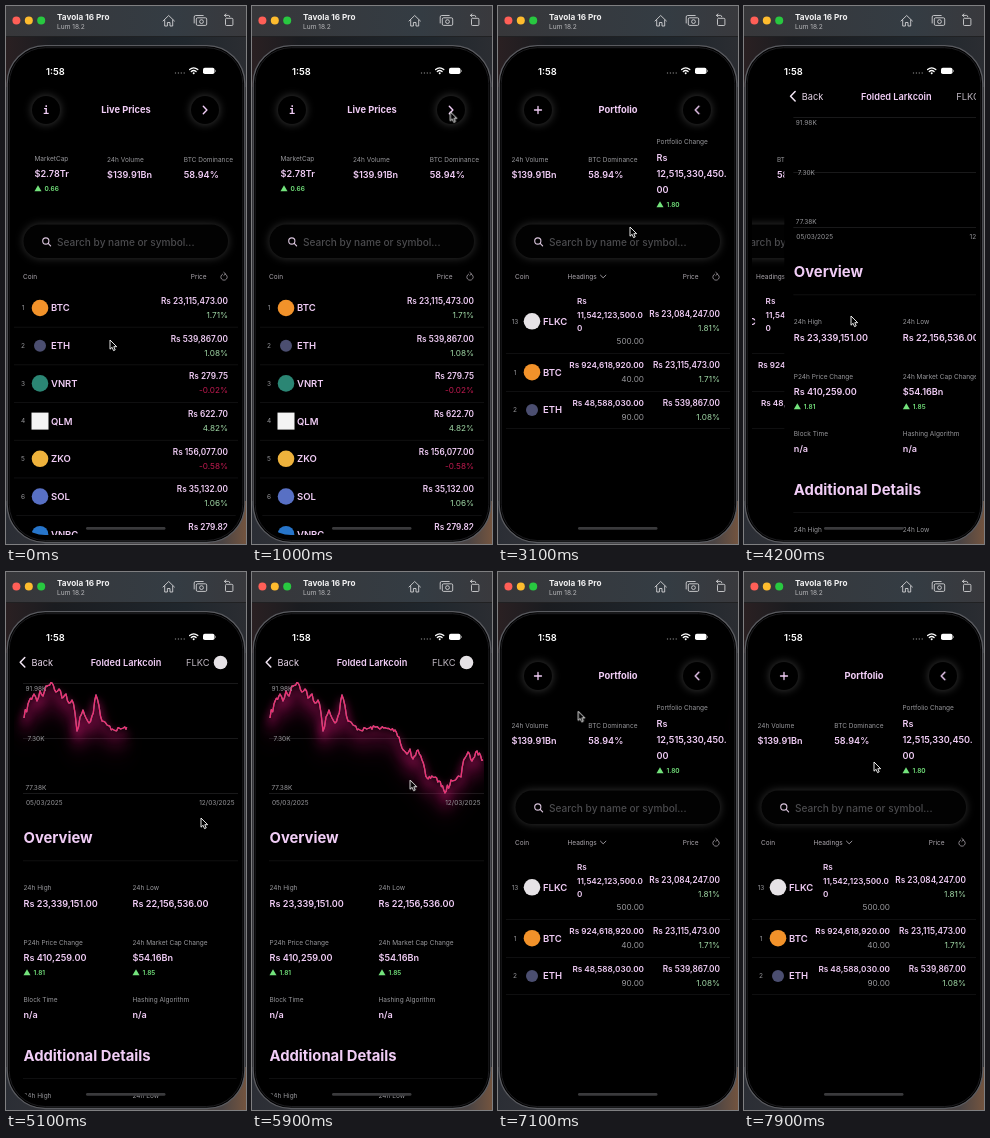
Recreate the animation shown at these times as an HTML page. Size 240x538 px, loop 8 s.

```html
<!DOCTYPE html>
<html lang="en">
<head>
<meta charset="utf-8">
<title>Portfolio app</title>
<style>
  html, body { margin: 0; width: 100%; height: 100%; overflow: hidden; background: #000; }
  svg { display: block; width: 240px; height: 538px; font-family: Inter, "Liberation Sans", sans-serif; }
  text { white-space: pre; }
  .glow { filter: drop-shadow(0 0 4px rgba(255, 255, 255, .24)); }
  .bar { filter: drop-shadow(0 0 4px rgba(255, 255, 255, .2)); }
  .spin { transform-box: fill-box; transform-origin: center; }
  .line {
    filter: drop-shadow(.7px 0 0 #82898a) drop-shadow(0 5px 4px rgba(215, 20, 120, .9))
      drop-shadow(0 10px 6px rgba(215, 20, 120, .6)) drop-shadow(0 15px 7px rgba(200, 15, 110, .25));
  }
</style>
</head>
<body>
<svg id="stage" viewBox="0 0 240 538">
  <defs>
    <clipPath id="screen"><rect x="8" y="46" width="224" height="483" rx="31"/></clipPath>
    <linearGradient id="wallTop">
      <stop offset="0" stop-color="#2a2022"/><stop offset=".2" stop-color="#1a1c20"/>
      <stop offset=".75" stop-color="#20272d"/><stop offset="1" stop-color="#2b2d32"/>
    </linearGradient>
    <linearGradient id="wallBottom">
      <stop offset="0" stop-color="#2b2e35"/><stop offset=".9" stop-color="#4a4444"/>
      <stop offset="1" stop-color="#73543f"/>
    </linearGradient>
    <linearGradient id="toolbar">
      <stop offset="0" stop-color="#37373a"/><stop offset=".7" stop-color="#343c43"/>
      <stop offset="1" stop-color="#39393d"/>
    </linearGradient>
  </defs>
</svg>
<script>
const LOOP = 8000;
const TOGGLE = 1400, PUSH = 4050, POP = 6650;
const DRAW = 4570;
const SLIDE = 'cubic-bezier(.25,.8,.4,1)';
const SPRING = 'cubic-bezier(.3,.75,.35,1)';
const HOLD = 'steps(1,end)';
const PINK = '#f1cdf6', GRAY = '#97979b', GREEN = '#a0d8a6', RED = '#c01a50', LIME = '#73e37c';

const stage = document.getElementById('stage');

function add(parent, tag, attrs = {}) {
  const el = document.createElementNS('http://www.w3.org/2000/svg', tag);
  for (const k in attrs) el.setAttribute(k, attrs[k]);
  return parent.appendChild(el);
}
const group = (parent, attrs) => add(parent, 'g', attrs);
const rect = (p, x, y, width, height, fill, more) => add(p, 'rect', { x, y, width, height, fill, ...more });
const disc = (p, cx, cy, r, fill, more) => add(p, 'circle', { cx, cy, r, fill, ...more });
const stroke = (p, d, color, width = 1, more) => add(p, 'path', {
  d, fill: 'none', stroke: color, 'stroke-width': width,
  'stroke-linecap': 'round', 'stroke-linejoin': 'round', ...more });

// y is the middle of the capital letters
function label(p, s, x, y, size, fill = GRAY, weight = 400, anchor = 'start') {
  const el = add(p, 'text', { x, y: y + size * .36, fill, 'font-size': size, 'font-weight': weight, 'text-anchor': anchor });
  el.textContent = s;
  return el;
}
const rule = (p, y, x = 8, w = 224, color = '#161617') => rect(p, x, y, w, .7, color);

function play(el, steps) {
  el.animate(steps.map(([t, props, easing = 'linear']) => ({ offset: t / LOOP, easing, ...props })),
    { duration: LOOP, iterations: Infinity });
}
const move = (x, y = 0) => ({ transform: `translate(${x}px,${y}px)` });
const fade = opacity => ({ opacity });

function swap(before, after) {
  play(before, [[0, fade(1), HOLD], [TOGGLE, fade(0)], [LOOP, fade(0)]]);
  play(after, [[0, fade(0), HOLD], [TOGGLE, fade(1)], [LOOP, fade(1)]]);
}
function slide(el, from, to) {
  play(el, [[0, move(from)], [TOGGLE, move(from), SPRING], [TOGGLE + 290, move(to)], [LOOP, move(to)]]);
}

function gain(p, x, y, s) {
  add(p, 'path', { d: `M${x} ${y + 3}l3.5-6 3.5 6z`, fill: LIME });
  label(p, s, x + 10, y, 6.5, LIME, 600);
}
function stat(p, x, y, title, value, change) {
  label(p, title, x, y, 6.5);
  label(p, value, x, y + 15.3, 9.1, PINK, 600);
  if (change) gain(p, x, y + 30, change);
}
function reload(p, x, y) {
  stroke(p, `M${x + 1.2} ${y - 2.8}a3.2 3.2 0 1 1-2.6 .1M${x - .2} ${y - 4.4}l1.7 1.5-1.7 1.5`, '#b9b2bb', .7);
}

function coin(p, y, [rank, symbol, color, price, change, square]) {
  label(p, rank, 17, y, 6.5, GRAY, 400, 'middle');
  if (square) rect(p, 25.5, y - 8.5, 17, 17, color);
  else disc(p, 34, y, symbol === 'ETH' ? 6 : 8.3, color);
  label(p, symbol, 45, y, 9.5, PINK, 600);
  label(p, 'Rs ' + price, 222, y - 7, 8.25, PINK, 600, 'end');
  label(p, change + '%', 222, y + 7, 8.2, change < 0 ? RED : GREEN, 400, 'end');
}

const BTC = ['1', 'BTC', '#f2922a', '23,115,473.00', '1.71'];
const ETH = ['2', 'ETH', '#4b4e70', '539,867.00', '1.08'];
const market = [
  BTC, ETH,
  ['3', 'VNRT', '#2b8674', '279.75', '-0.02'],
  ['4', 'QLM', '#f4f4f4', '622.70', '4.82', true],
  ['5', 'ZKO', '#eeb23c', '156,077.00', '-0.58'],
  ['6', 'SOL', '#5870c4', '35,132.00', '1.06'],
  ['7', 'VNRC', '#2775ca', '279.82', '-0.01'],
];

function desktop() {
  rect(stage, 0, 0, 240, 538, '#141416');
  rect(stage, 0, 31, 240, 50, 'url(#wallTop)');
  rect(stage, 0, 495, 240, 43, 'url(#wallBottom)');
  rect(stage, 0, 0, 240, 31, 'url(#toolbar)');
  rect(stage, 0, 30.4, 240, .6, '#111');
  ['#ff5f57', '#febc2e', '#28c840'].forEach((c, i) => disc(stage, 10.4 + i * 12.4, 14.5, 4, c));
  label(stage, 'Tavola 16 Pro', 51, 10.8, 8.2, '#f0f0f1', 700);
  label(stage, 'Lum 18.2', 51, 20.3, 6.6, '#b8b8bb');
  const c = '#d2d2d4';
  stroke(stage, 'M157 15l5.7-5.5 5.7 5.5M158.7 14v6h2.7v-3.5h2.6v3.5h2.7v-6', c, .9);
  rect(stage, 190.3, 11.8, 10.4, 7.6, 'none', { rx: 1.3, stroke: c, 'stroke-width': .9 });
  stroke(stage, 'M188.2 17v-6q0-1.5 1.5-1.5h7.5', c, .9);
  disc(stage, 195.5, 15.6, 1.9, 'none', { stroke: c, 'stroke-width': .9 });
  rect(stage, 219.5, 12.3, 7.4, 7.2, 'none', { rx: 1, stroke: c, 'stroke-width': .9 });
  stroke(stage, 'M218.6 9.4h3.8q1.4 0 1.4 1.4M220 8l-1.6 1.4 1.6 1.4', c, .9);
  rect(stage, 1.2, 39.7, 237.6, 496.8, '#000', { rx: 38, stroke: '#5a5b60', 'stroke-width': 1.3 });
  rect(stage, 3.2, 41.7, 233.6, 492.8, 'none', { rx: 36, stroke: '#1d1d20', 'stroke-width': 1 });
}

function statusBar() {
  label(stage, '1:58', 40, 65.2, 9.4, '#fff', 600);
  for (let i = 0; i < 4; i++) disc(stage, 169.5 + i * 2.9, 67, .7, '#777');
  stroke(stage, 'M183.6 63.6q4.1-3.5 8.2 0M185.3 65.5q2.4-2 4.8 0', '#fff', 1.3);
  disc(stage, 187.7, 67.2, 1, '#fff');
  rect(stage, 197, 61.8, 11.5, 6.2, '#fff', { rx: 1.8 });
  rect(stage, 209, 63.8, .9, 2.2, '#999', { rx: .4 });
}

function header(p) {
  const ring = disc(p, 40, 104, 26, 'none', { stroke: '#d8d8d8', 'stroke-width': 3, class: 'spin' });
  const scale = (k, opacity) => ({ transform: `scale(${k})`, opacity });
  play(ring, [[0, scale(0, 0), HOLD], [TOGGLE, scale(0, .7), 'ease-out'], [TOGGLE + 500, scale(1, 0)], [LOOP, scale(1, 0)]]);
  disc(p, 40, 104, 14, '#000', { class: 'glow' });
  disc(p, 199, 104, 14, '#000', { class: 'glow' });
  const info = label(p, 'i', 40, 104, 10, PINK, 700, 'middle');
  info.setAttribute('font-family', '"DejaVu Sans Mono", monospace');
  swap(info, stroke(p, 'M36.5 104h7M40 100.5v7', PINK, 1.3));
  swap(label(p, 'Live Prices', 120, 104, 9.3, PINK, 700, 'middle'),
    label(p, 'Portfolio', 120, 104, 9.4, PINK, 700, 'middle'));
  const chevron = stroke(p, 'M197.3 100.2l3.6 3.8-3.6 3.8', PINK, 1.4, { class: 'spin' });
  const turn = deg => ({ transform: `rotate(${deg}deg)` });
  play(chevron, [[0, turn(0)], [TOGGLE, turn(0), SPRING], [TOGGLE + 290, turn(180)], [LOOP, turn(180)]]);
}

function stats(p) {
  const g = group(p);
  stat(g, 28.5, 152.3, 'MarketCap', '$2.78Tr', '0.66');
  stat(g, 101, 153.5, '24h Volume', '$139.91Bn');
  stat(g, 177.8, 153.5, 'BTC Dominance', '58.94%');
  label(g, 'Portfolio Change', 246, 136, 6.5);
  ['Rs', '12,515,330,450.', '00'].forEach((s, i) => label(g, s, 246, 152 + i * 16, 9.1, PINK, 600));
  gain(g, 246, 198.3, '1.80');
  slide(g, 0, -87.5);
}

function searchBar(p) {
  rect(p, 17.5, 218.5, 204.5, 33.5, '#020202', { rx: 16.7, class: 'bar' });
  disc(p, 39.8, 235, 3.1, 'none', { stroke: '#d9c4dc', 'stroke-width': 1.1 });
  stroke(p, 'M42.2 237.4l2.4 2.5', '#d9c4dc', 1.2);
  label(p, 'Search by name or symbol...', 51, 236, 10.1, '#4b4b4e', 500);
}

function holding(p, y, amount, count) {
  label(p, 'Rs ' + amount, 146, y - 7, 8.2, PINK, 600, 'end');
  label(p, count, 146, y + 6.6, 8.2, GRAY, 400, 'end');
}

function lists(p) {
  label(p, 'Coin', 17, 270.3, 6.5, '#aaa5ac');
  label(p, 'Price', 200.5, 270.3, 6.5, '#aaa5ac', 400, 'end');
  reload(p, 218, 270.8);
  const heads = group(p);
  label(heads, 'Headings', 69.5, 270.3, 6.5, '#aaa5ac');
  stroke(heads, 'M102.5 269.2l2.7 2.6 2.7-2.6', '#aaa5ac', .9);
  swap(group(p), heads);

  const all = group(p);
  market.forEach((c, i) => {
    const y = 302 + i * 37.7;
    coin(all, y, c);
    rule(all, y + 18.8);
  });
  slide(all, 0, -240);

  const own = group(p);
  coin(own, 315.3, ['13', 'FLKC', '#e6e2e6', '23,084,247.00', '1.81']);
  ['Rs', '11,542,123,500.0', '0'].forEach((s, i) => label(own, s, 79, 295.5 + i * 13.2, 8.15, PINK, 600));
  label(own, '500.00', 146, 335.3, 8.2, GRAY, 400, 'end');
  coin(own, 366.2, BTC);
  holding(own, 366.2, '924,618,920.00', '40.00');
  coin(own, 404, ETH);
  holding(own, 404, '48,588,030.00', '90.00');
  [347, 385, 422.3].forEach(y => rule(own, y));
  slide(own, 240, 0);
}

// turning points of the price curve, joined with a seeded wobble
function curve() {
  const pts = [18, 146, 22, 132, 28, 122, 31, 129, 34, 119, 37, 124, 40, 114, 46, 111, 50, 120, 53, 117,
    56, 126, 60, 122, 63, 131, 66, 128, 69, 141, 71, 159, 74, 145, 77, 138, 80, 146, 83, 151, 86, 144,
    90, 123, 93, 134, 96, 149, 101, 153, 108, 158, 124, 155, 143, 158, 147, 165, 150, 176, 155, 182,
    158, 177, 161, 187, 166, 178, 170, 188, 175, 206, 181, 205, 187, 209, 193, 221, 199, 208, 209, 205,
    213, 186, 216, 180, 220, 189, 225, 179, 231, 188];
  let seed = 7;
  const rnd = () => (seed = seed * 16807 % 2147483647) / 2147483647 - .5;
  let d = `M${pts[0]} ${pts[1]}`;
  for (let i = 2; i < pts.length; i += 2) {
    const [x0, y0, x, y] = pts.slice(i - 2, i + 2);
    const n = Math.max(2, Math.round((x - x0) / 1.3));
    const rough = 2.5 + Math.abs(y - y0) * .35;
    for (let k = 1; k <= n; k++) {
      const wobble = k < n ? rnd() * rough : 0;
      d += `L${(x0 + (x - x0) * k / n).toFixed(1)} ${(y0 + (y - y0) * k / n + wobble).toFixed(1)}`;
    }
  }
  return d;
}

function detail(p) {
  rect(p, 8, 40, 224, 498, '#000');
  stroke(p, 'M18.8 85.6l-4.6 4.7 4.6 4.7', '#f3e6f5', 1.5);
  label(p, 'Back', 25.5, 90.5, 9.2, '#e6d5e8');
  label(p, 'Folded Larkcoin', 120, 90.3, 9.2, PINK, 600, 'middle');
  label(p, 'FLKC', 203.5, 90.5, 9.3, '#bdb5bf', 400, 'end');
  disc(p, 214.5, 90.5, 6.8, '#e6e2e6');

  [111, 166, 221].forEach(y => rule(p, y, 17, 215, '#242426'));
  const line = stroke(p, curve(), '#f02d74', 1.3, {
    class: 'line', pathLength: 1, 'stroke-dasharray': '1 1', 'stroke-linecap': 'butt' });
  const drawn = k => ({ strokeDashoffset: 1 - k });
  play(line, [[0, drawn(0)], [DRAW, drawn(0)], [DRAW + 1000, drawn(1), HOLD], [7500, drawn(0)], [LOOP, drawn(0)]]);
  label(p, '91.98K', 19.5, 116.8, 6.5);
  label(p, '7.30K', 21.5, 166.6, 6.5);
  label(p, '77.38K', 19.5, 216, 6.5);
  label(p, '05/03/2025', 20, 231, 6.5);
  label(p, '12/03/2025', 228.5, 231, 6.5, GRAY, 400, 'end');

  label(p, 'Overview', 17.5, 266, 14.8, PINK, 700);
  rule(p, 288.5, 17, 215);
  [
    [17.5, 316, '24h High', 'Rs 23,339,151.00'],
    [126.5, 316, '24h Low', 'Rs 22,156,536.00'],
    [17.5, 370.3, 'P24h Price Change', 'Rs 410,259.00', '1.81'],
    [126.5, 370.3, '24h Market Cap Change', '$54.16Bn', '1.85'],
    [17.5, 427.7, 'Block Time', 'n/a'],
    [126.5, 427.7, 'Hashing Algorithm', 'n/a'],
  ].forEach(cell => stat(p, ...cell));
  label(p, 'Additional Details', 17.5, 484, 14.8, PINK, 700);
  rule(p, 506, 17, 215);
  label(p, '24h High', 17.5, 523.3, 6.5);
  label(p, '24h Low', 126.5, 523.3, 6.5);
}

function pointer() {
  const g = group(stage);
  add(g, 'path', {
    d: 'M0 0v9.2l2.1-1.9 1.4 3.3 1.7-.7-1.4-3.2h2.9z',
    fill: '#000', stroke: '#fff', 'stroke-width': .9, 'stroke-linejoin': 'round' });
  const path = [
    [0, 104, 334], [250, 104, 334], [1050, 199, 104], [1430, 199, 104], [1700, 173, 258],
    [2400, 170, 250], [3100, 132, 221], [3750, 107, 310], [4350, 107, 310], [5100, 195, 246],
    [5700, 190, 238], [6350, 30, 88], [6750, 30, 88], [7450, 130, 190], [LOOP, 130, 190],
  ];
  play(g, path.map(([t, x, y]) => [t, move(x, y), 'ease-in-out']));
}

desktop();
const screen = group(stage, { 'clip-path': 'url(#screen)' });
const home = group(screen);
header(home);
stats(home);
searchBar(home);
lists(home);
const page = group(screen);
detail(page);

function pushPop(el, back, front) {
  play(el, [[0, move(back)], [PUSH, move(back), SLIDE], [PUSH + 350, move(front)],
    [POP, move(front), SLIDE], [POP + 350, move(back)], [LOOP, move(back)]]);
}
pushPop(home, 0, -67);
pushPop(page, 226, 0);

statusBar();
rect(stage, 80, 521, 79.5, 2.8, '#3a3a3c', { rx: 1.4 });
pointer();
</script>
</body>
</html>
```
